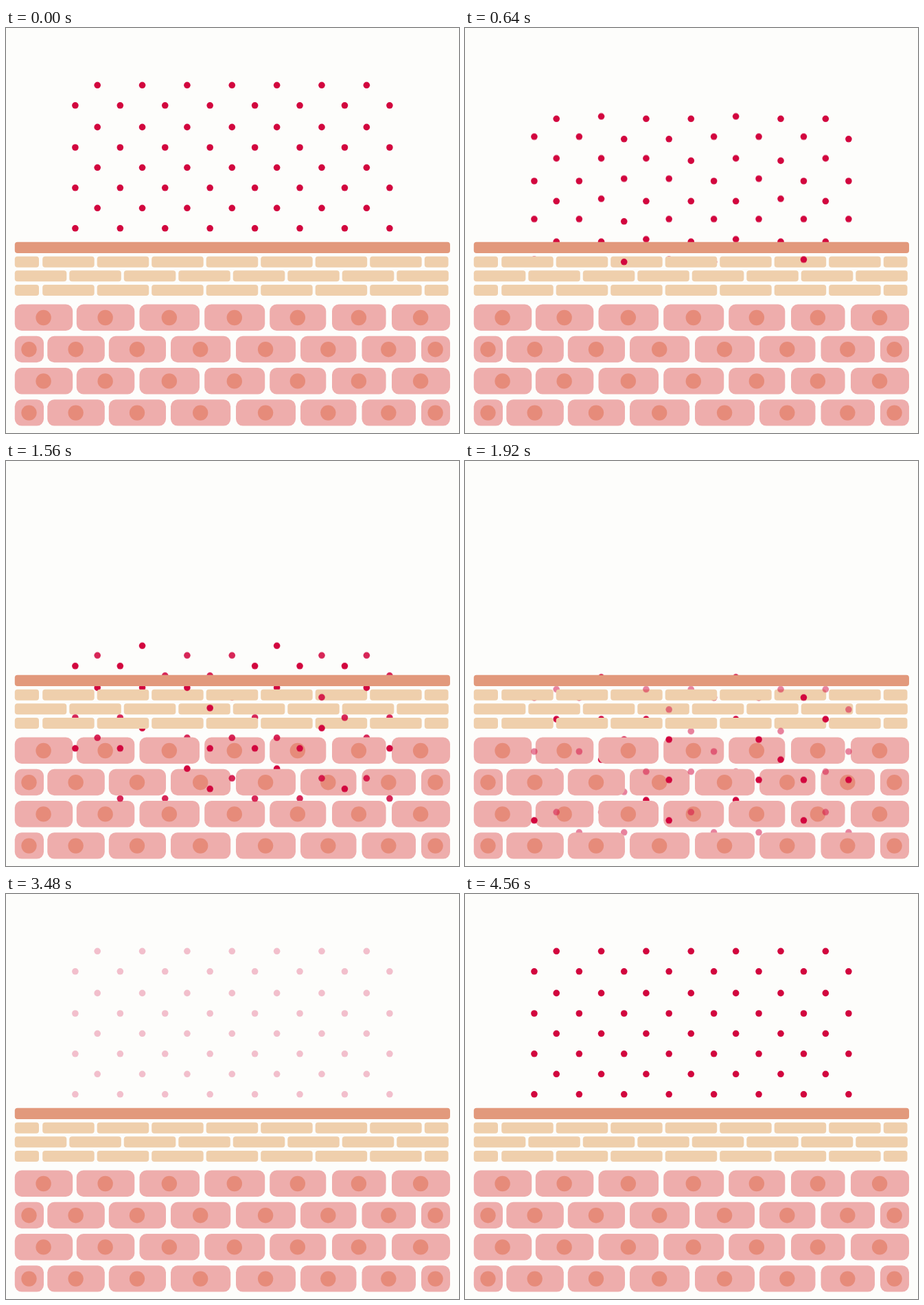
Recreate the animation shown at these times as an HTML page. Size 660 by 590 pixels, loop 5000 ms.

```html
<!DOCTYPE html>
<html lang="en">
<head>
<meta charset="utf-8">
<title>Particles sinking through skin layers</title>
<style>
  html, body { margin: 0; width: 100%; height: 100%; overflow: hidden; background: #fdfdfb; }
  svg { display: block; width: 660px; height: 590px; }
  .bar { fill: #e2997c; }
  .brick { fill: #efcfac; }
  .cell { fill: #eeadac; }
  .nucleus { fill: #e68b7a; }
  .dots { fill: #d2063e; }
</style>
</head>
<body>
<svg viewBox="0 0 660 590">
  <g id="under"></g>
  <g id="fast" class="dots"></g>
  <g id="slow" class="dots"></g>
  <g id="over"></g>
</svg>
<script>
const LOOP = 5000;
const SINK_END = 2400;
const layer = id => document.getElementById(id);

function add(parent, tag, attrs) {
  const node = document.createElementNS('http://www.w3.org/2000/svg', tag);
  for (const name in attrs) node.setAttribute(name, attrs[name]);
  parent.appendChild(node);
}

function block(parent, kind, [left, right], y, height, rx) {
  add(parent, 'rect', { class: kind, x: left, y, width: right - left, height, rx });
}

// Each mask holds one flag per block: "o" lies over the dots, "u" under them.
const side = flag => layer(flag === 'o' ? 'over' : 'under');

const run = (start, count) =>
  Array.from({ length: count }, (_, i) => [start + 79.5 * i, start + 79.5 * i + 75.5]);
const edgedBricks = [[12.8, 48], ...run(53.2, 7), [609.8, 644.5]];
const fullBricks = run(12.8, 8);
const wideCells = [[12.8, 97.2], [102.8, 187.3], [194.5, 282], [289.2, 377.2], [384.2, 466.3], [475, 553.6], [562, 647]];
const edgedCells = [[12.8, 55], [60.3, 143.8], [149.8, 233], [240, 327.2], [335, 422], [429, 510.5], [518.5, 597], [605, 647]];

[
  [332.7, edgedBricks, 'ooouoouoo'],
  [353.2, fullBricks, 'ououuouo'],
  [374, edgedBricks, 'oooooouoo']
].forEach(([y, row, mask]) =>
  row.forEach((span, i) => block(side(mask[i]), 'brick', span, y, 16, 4)));

[
  [wideCells, 'uuouuou'],
  [edgedCells, 'ooououuo'],
  [wideCells, 'uuououu'],
  [edgedCells, 'oooooooo']
].forEach(([row, mask], n) => {
  const y = 402.6 + 46.2 * n;
  row.forEach((span, i) => {
    const parent = side(mask[i]);
    block(parent, 'cell', span, y, 38.4, 10);
    add(parent, 'circle', { class: 'nucleus', cx: (span[0] + span[1]) / 2 - 0.4, cy: y + 19.4, r: 11.2 });
  });
});

block(layer('over'), 'bar', [12.8, 647], 311.8, 16.2, 4);

// Rows of dots: height, then the speed of each dot ("f" fast, "s" slow).
[
  [83.3, 'fsffsff'],
  [112.8, 'ssffsssf'],
  [144.4, 'sssfsfs'],
  [174, 'ffssfsff'],
  [203.3, 'fsfffsf'],
  [232.8, 'ssfsssss'],
  [262.3, 'ffsfsff'],
  [291.8, 'sffsffsf']
].forEach(([cy, speeds], row) => {
  const [start, pitch] = row % 2 ? [100.9, 65.43] : [133.2, 65.36];
  [...speeds].forEach((speed, i) =>
    add(layer(speed === 'f' ? 'fast' : 'slow'), 'circle', { cx: start + pitch * i, cy, r: 4.8 }));
});

// Steps are [time in ms, value, easing to the next step].
function play(node, property, steps) {
  const frames = steps.map(([time, value, easing = 'linear']) =>
    ({ offset: time / LOOP, [property]: value, easing }));
  return node.animate(frames, { duration: LOOP, iterations: Infinity });
}

function sink(id, distance, fadeStart) {
  const node = layer(id);
  const end = `translateY(${distance}px)`, home = 'translateY(0px)';
  return [
    play(node, 'transform', [
      [0, home, 'cubic-bezier(0.3333, 0, 0.6667, 1)'], [SINK_END, end],
      [2800, end], [2800, home], [LOOP, home]
    ]),
    play(node, 'opacity', [
      [0, 1], [fadeStart, 1], [SINK_END, 0], [3200, 0], [4320, 1], [LOOP, 1]
    ])
  ];
}

const motions = [...sink('fast', 278, 1440), ...sink('slow', 258.5, 1920)];
const now = document.timeline.currentTime;
motions.forEach(motion => { motion.startTime = now; });
</script>
</body>
</html>
```
